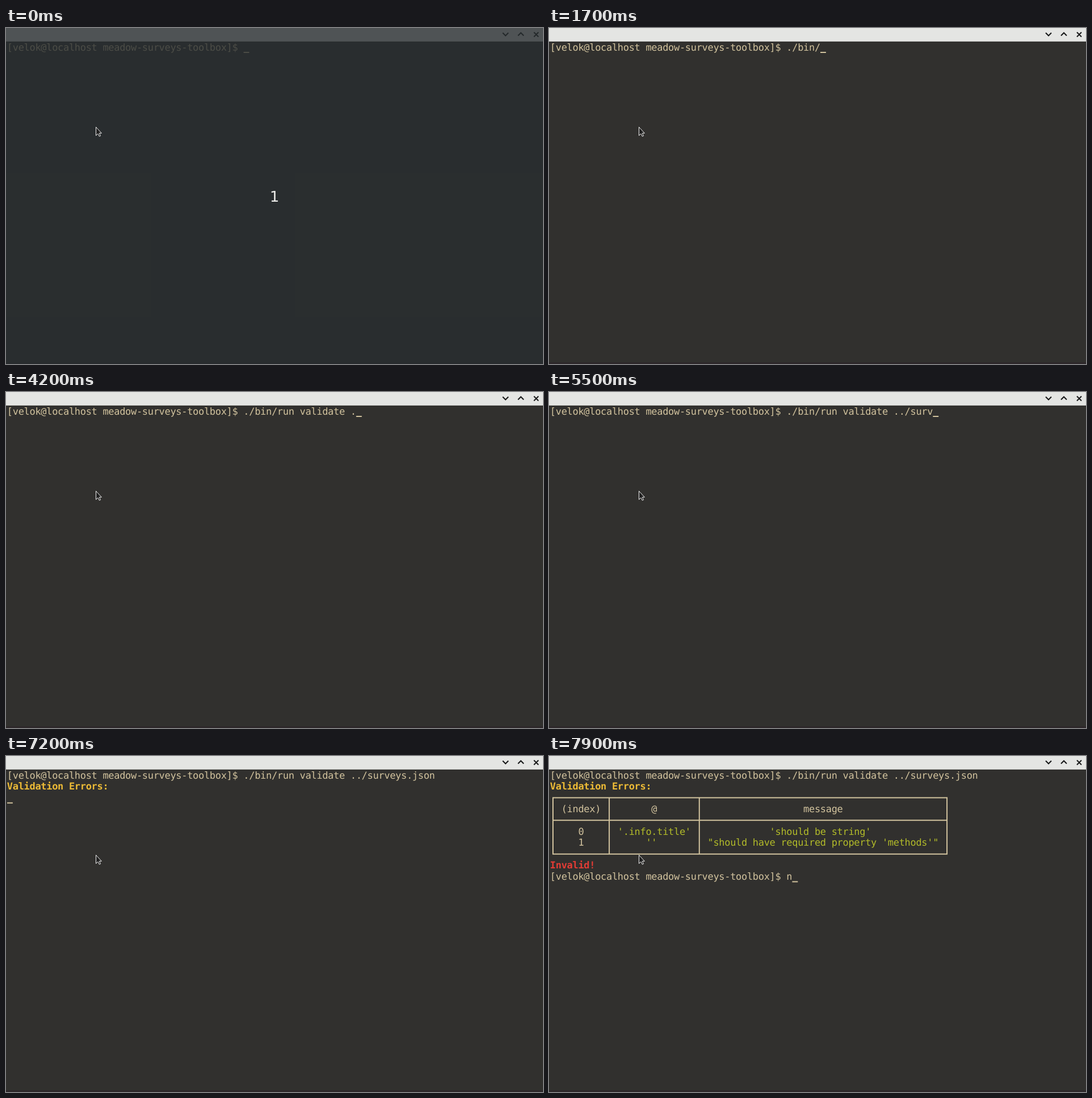
An HTML page that plays this animation: 946x592 px, repeating every 8 s.

```html
<!DOCTYPE html>
<html lang="en">
<head>
<meta charset="utf-8">
<title>Terminal</title>
<style>
  html, body { margin: 0; width: 100%; height: 100%; overflow: hidden; background: #31302e; }
  svg { display: block; width: 946px; height: 592px; }
  text {
    white-space: pre; fill: #d2c39e; text-rendering: geometricPrecision;
    font: 17px "DejaVu Sans Mono", monospace; letter-spacing: -.318px;
  }
  .bold { font-weight: bold; }
  .yellow { fill: #edbb36; }
  .green { fill: #b2bb29; }
  .red { fill: #e33c35; }
  #count text { font: 26px "DejaVu Sans", sans-serif; letter-spacing: 0; fill: #eeeeec; text-anchor: middle; }
</style>
</head>
<body>
<svg viewBox="0 0 946 592">
  <rect width="946" height="592" fill="#31302e"/>
  <rect y="589" width="946" height="3" fill="#2d282a"/>
  <rect width="946" height="23.8" fill="#e4e5e3"/>
  <path d="M875 8.5l5 5 5-5M902 13.5l5-5 5 5M930 7.5l8 8M938 7.5l-8 8" fill="none" stroke="#151617" stroke-width="2"/>
  <g id="shell"></g>
  <g id="heading"></g>
  <g id="report">
    <path d="M7 73.6H701.1V172.7H7ZM7 113.2H701.1M106.1 73.6V172.7M264.8 73.6V172.7" fill="none" stroke="#d2c39e" stroke-width="2"/>
  </g>
  <rect id="cursor" width="9.9" height="2" fill="#d2c39e"/>
  <g id="count">
    <rect width="946" height="592" fill="rgb(40,45,47)" fill-opacity=".79"/>
    <text x="473" y="306">1</text>
  </g>
  <path d="M158.5 174.5V189.5L161.9 186.3L164.4 191L166.5 190L164.4 185.3H168.4Z" fill="#222" stroke="#eee"/>
</svg>
<script>
const CELL = 9.917, ROW = 19.833, LEFT = 2, TOP = 24;
const PROMPT = "[velok@localhost meadow-surveys-toolbox]$ ";
const COMMAND = "./bin/run validate ../surveys.json ";

// [time in ms, characters typed so far]
const KEYS = [
  [500, 1], [700, 2], [1200, 3], [1300, 4], [1400, 5], [1700, 6], [1900, 7], [2000, 10],
  [2500, 11], [2800, 12], [2900, 13], [3200, 15], [3400, 17], [3500, 18], [3700, 19],
  [4200, 20], [4300, 21], [4400, 22], [5000, 23], [5200, 24], [5300, 25], [5500, 26], [5600, 35]
];

const el = id => document.getElementById(id);

function put(group, col, row, string, style = "") {
  const node = document.createElementNS("http://www.w3.org/2000/svg", "text");
  node.setAttribute("x", LEFT + col * CELL - 0.16);
  node.setAttribute("y", TOP + row * ROW + 15.5);
  node.setAttribute("class", style);
  node.textContent = string;
  el(group).append(node);
  return node;
}

const input = put("shell", 0, 0, PROMPT);
put("heading", 0, 1, "Validation Errors:", "bold yellow");
put("report", 2, 3, "(index)");
put("report", 18, 3, "@");
put("report", 45, 3, "message");
put("report", 5, 5, "0");
put("report", 12, 5, "'.info.title'", "green");
put("report", 39, 5, "'should be string'", "green");
put("report", 5, 6, "1");
put("report", 17, 6, "''", "green");
put("report", 28, 6, "\"should have required property 'methods'\"", "green");
put("report", 0, 8, "Invalid!", "bold red");
const next = put("report", 0, 9, PROMPT);

function show(id, on) {
  el(id).style.display = on ? "" : "none";
}

function moveCursor(col, row) {
  el("cursor").setAttribute("x", LEFT + col * CELL);
  el("cursor").setAttribute("y", TOP + row * ROW + 18);
}

function draw() {
  const t = performance.now() % 8000;
  const typed = KEYS.reduce((n, [at, count]) => t >= at ? count : n, 0);
  input.textContent = PROMPT + COMMAND.slice(0, typed);
  next.textContent = PROMPT + (t >= 7900 ? "n" : "");
  show("count", t < 100);
  show("heading", t >= 7200);
  show("report", t >= 7300);
  if (t >= 7300) moveCursor(next.textContent.length, 9);
  else if (t >= 7200) moveCursor(0, 2);
  else if (t >= 6400) moveCursor(0, 1);
  else moveCursor(input.textContent.length, 0);
  requestAnimationFrame(draw);
}
draw();
</script>
</body>
</html>
```
